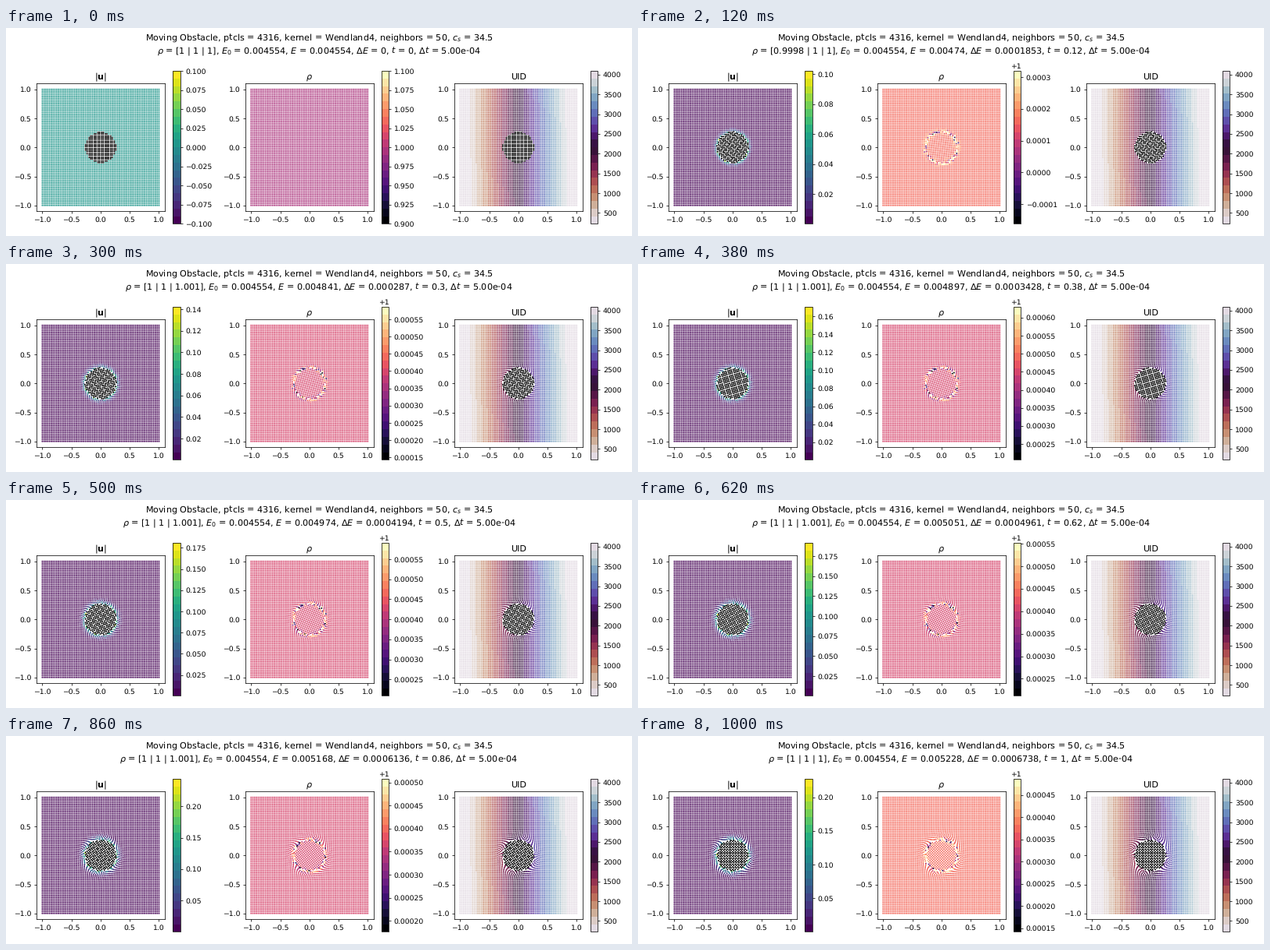
These frames come from a looping animation (800x267 px, 1020 ms). A matplotlib script:

```python
import numpy as np
import matplotlib.pyplot as plt
from matplotlib.animation import FuncAnimation

plt.rcParams["text.hinting"] = "no_hinting"

W, H = 800, 267
DPI = 200 / 3
FRAMES, STEP = 51, 20
SIDE = 66          # lattice points per edge
COUNT = 4316
R = 0.266          # obstacle radius
OMEGA = np.pi / 4  # obstacle spin, rad/s
E0 = 0.00455445

# Measured histories, interpolated in time
KEYS = [0.02, 0.12, 0.22, 0.38, 0.62, 0.86, 1.0]
U_MAX = [0.06, 0.1022, 0.1139, 0.1704, 0.1915, 0.2434, 0.2272]
RHO_LO = np.array([-300, -162, 80, 206, 212, 176, 142]) * 1e-6
RHO_HI = np.array([130, 320, 542, 630, 552, 508, 486]) * 1e-6
RHO_MID = np.array([30, 175, 345, 445, 406, 366, 378]) * 1e-6
DELTA_E = [1.042e-4, 1.853e-4, 2.312e-4, 3.428e-4, 4.961e-4, 6.136e-4, 6.738e-4]

rng = np.random.default_rng(4)
line = np.linspace(-1, 1, SIDE)
x0, y0 = (a.ravel() for a in np.meshgrid(line, line, indexing="ij"))
radius = np.hypot(x0, y0)
angle = np.arctan2(y0, x0)
solid = radius < R
fluid = ~solid
uid = np.arange(x0.size) * COUNT / x0.size
gap = np.maximum(radius - R, 0)
jitter = rng.normal(size=x0.size)
gain = rng.uniform(0.4, 1.1, x0.size)

times = np.linspace(0, 1, FRAMES)
drag = np.cumsum(np.interp(times, KEYS, U_MAX)) / R / (FRAMES - 1)
drag -= drag[0]

fig = plt.figure(figsize=(W / DPI, H / DPI), dpi=DPI, facecolor="white")


def box(x, top, w, h):
    return fig.add_axes([x / W, 1 - (top + h) / H, w / W, h / H])


def panel(x, title, cmap, values, limits, shown):
    ax = box(x, 71.3, 163.9, 163.9)
    ax.set(xlim=(-1.1, 1.1), ylim=(-1.1, 1.1))
    ax.set_xticks(np.linspace(-1, 1, 5))
    ax.set_yticks(np.linspace(-1, 1, 5))
    ax.set_title(title)
    dots = ax.scatter(x0[shown], y0[shown], c=values[shown], s=4.6, marker="8",
                      linewidths=0, cmap=plt.get_cmap(cmap, 20),
                      vmin=limits[0], vmax=limits[1])
    cax = box(x + 173.8, 55, 9.8, 196.4)
    fig.colorbar(dots, cax=cax)
    cax.yaxis.set_offset_position("right")
    return ax, dots


def black_dots(ax):
    n = solid.sum()
    return ax.scatter(x0[solid], y0[solid], s=5, marker="8", linewidths=0,
                      color=["k"] * n, zorder=3)


def snap(ax, pts):
    """Round points to a grid of two thirds of a pixel."""
    pix = ax.transData.transform(pts)
    return ax.transData.inverted().transform((np.floor(pix * 1.5) + 0.5) / 1.5)


ax_u, dots_u = panel(39, r"$|\mathbf{u}|$", "viridis", 0 * x0, (-0.1, 0.1), fluid)
ax_r, dots_r = panel(305.8, r"$\rho$", "magma", 1 + 0 * x0, (0.9, 1.1),
                     np.ones_like(solid))
ax_i, dots_i = panel(572.8, "UID", "twilight_r", uid, (225, 4095), fluid)
black_u, black_i = black_dots(ax_u), black_dots(ax_i)

fig.text(0.5, 1 - 16 / H,
         "Moving Obstacle, ptcls = 4316, kernel = Wendland4, "
         "neighbors = 50, $c_s$ = 34.5",
         ha="center", va="baseline", fontsize=12)
status = fig.text(0.5, 1 - 32.3 / H, "", ha="center", va="baseline", fontsize=12)


def positions(i, depth):
    t = times[i]
    near = np.exp(-gap / depth)
    turn = np.where(solid, OMEGA * t, 0.8 * drag[i] * near)
    r = radius + np.where(solid, 0, 0.003 * np.sqrt(t) * jitter * near)
    return np.column_stack([r * np.cos(angle + turn), r * np.sin(angle + turn)])


def draw(i):
    t = times[i]
    depth = 0.022 + 0.02 * np.sqrt(t)
    pts = positions(i, depth)
    dots_u.set_offsets(pts[fluid])
    dots_r.set_offsets(pts)
    dots_i.set_offsets(pts[fluid])
    black_u.set_offsets(snap(ax_u, pts[solid]))
    black_i.set_offsets(snap(ax_i, pts[solid]))

    if i == 0:
        lo = hi = gain_e = 0
        speed, rho = 0 * x0, 1 + 0 * x0
        dots_u.set_clim(-0.1, 0.1)
        dots_r.set_clim(0.9, 1.1)
    else:
        top, lo, hi, mid, gain_e = (
            np.interp(t, KEYS, k) for k in (U_MAX, RHO_LO, RHO_HI, RHO_MID, DELTA_E))
        speed = top * gain * np.exp(-gap / depth)
        rim = np.exp(-((radius - R - 0.01) / 0.03) ** 2)
        rho = 1 + np.clip(mid + 0.35 * (hi - lo) * jitter * rim, lo, hi)
        dots_u.set_clim(0.002 * top, top)
        dots_r.set_clim(1 + lo, 1 + hi)
    dots_u.set_array(speed[fluid])
    dots_r.set_array(rho)

    status.set_text(
        rf"$\rho$ = [{1 + lo:.4g} | 1 | {1 + hi:.4g}], $E_0$ = {E0:.4g}, "
        rf"$E$ = {E0 + gain_e:.4g}, $\Delta E$ = {gain_e:.4g}, "
        rf"$t$ = {t:.4g}, $\Delta t$ = 5.00e-04")
    return []


anim = FuncAnimation(fig, draw, frames=FRAMES, interval=STEP,
                     init_func=lambda: draw(0), repeat=True, repeat_delay=0)
plt.show()
```
